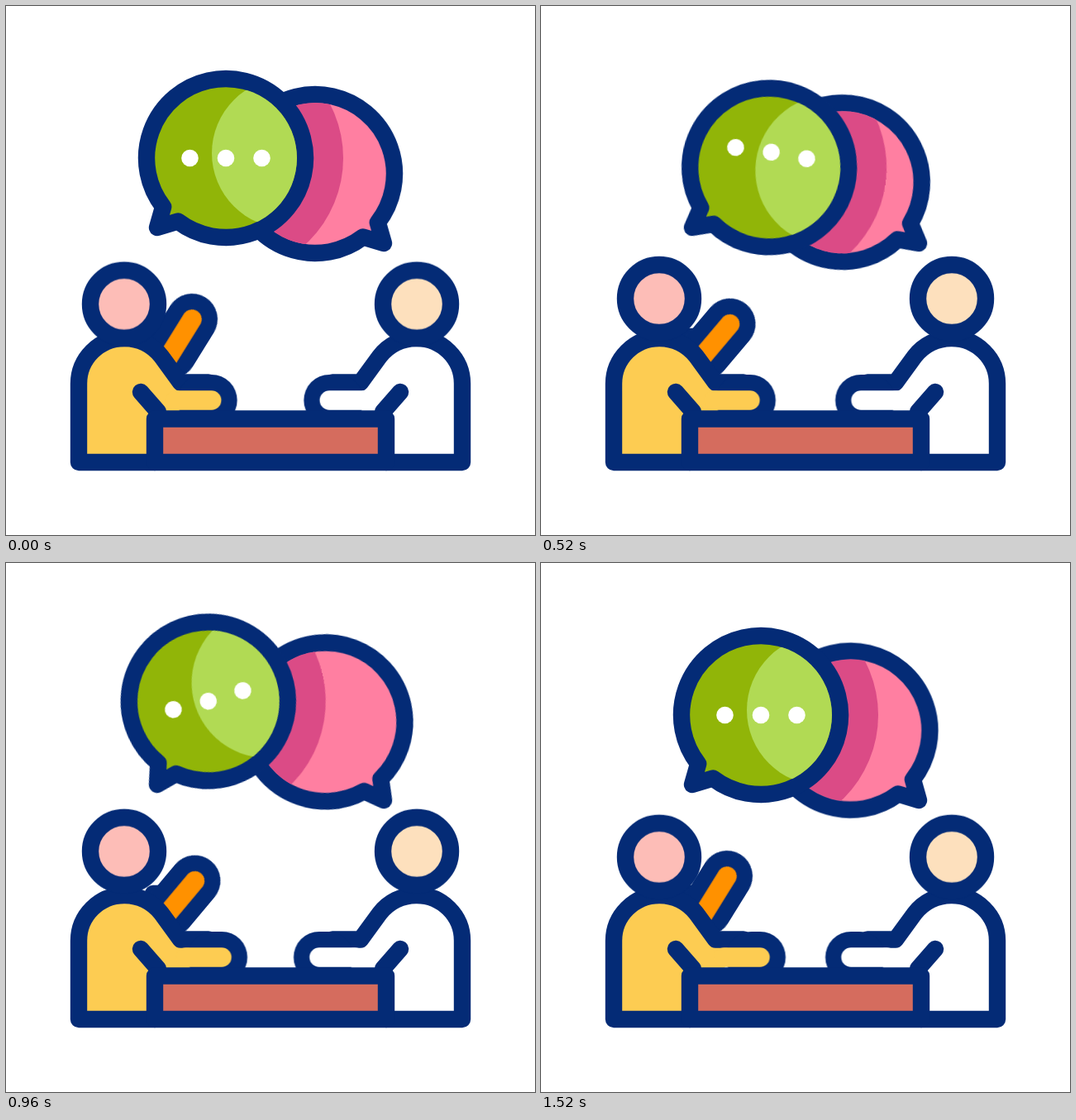
These frames come from a looping animation (640x640 px, 1560 ms). An HTML page without scripts:

```html
<!DOCTYPE html>
<html lang="en">
<head>
<meta charset="utf-8">
<title>Two people talking</title>
<style>
  html, body { margin: 0; width: 100%; height: 100%; overflow: hidden; background: #fff; }
  svg { display: block; width: 100%; height: 100%; }

  .line { stroke: #042b76; stroke-width: 20.4; stroke-linecap: round; stroke-linejoin: round; }
  .limb { fill: none; stroke-linecap: round; }
  .navy { stroke: #042b76; stroke-width: 62; }
  .skin { stroke: currentColor; stroke-width: 23.5; }
  .face { fill: var(--face); }

  .swing, .hop, .reach, .lean {
    animation: 1.56s cubic-bezier(.37, 0, .63, 1) var(--lag, 0s) infinite;
  }
  .swing { animation-name: swing; }
  .hop { animation-name: hop; }
  .reach { animation-name: reach; }
  .lean { animation-name: lean; }

  @keyframes swing {
    0%, 89.74%, 100% { transform: rotate(0deg); }
    30.77% { transform: rotate(7.8deg); }
    61.54%, 64.1% { transform: rotate(-13.1deg); }
  }
  @keyframes hop {
    0%, 57.69%, 100% { transform: translateY(0); }
    29.49%, 32.05% { transform: translateY(var(--rise)); }
  }
  @keyframes reach {
    0%, 89.1%, 100% { transform: translateX(0); }
    46.15%, 50% { transform: translateX(16.5px); }
  }
  @keyframes lean {
    0%, 89.1%, 100% { transform: translate(225px, 379px) rotate(31.8deg); }
    46.15%, 50% { transform: translate(229.3px, 386px) rotate(42deg); }
  }

  .person { --rise: -12.2px; }
  .dots { --rise: -19px; fill: #fff; }
  .late { --lag: .16s; }
</style>
</head>
<body>
<svg viewBox="0 0 640 640">
  <defs>
    <!-- Bubbles are drawn with the tip of the tail at the origin -->
    <path id="bubble" class="line" d="M7.2-25.1A96 96 0 1 1 25-7.5L0 0Z"/>
    <clipPath id="disc"><circle cx="83" cy="-84" r="86"/></clipPath>
    <clipPath id="pinkDisc" transform="translate(457 287) scale(-1 1)">
      <circle class="swing late" cx="83" cy="-84" r="86"/>
    </clipPath>

    <g id="person">
      <path class="line" fill="currentColor" d="M180 552H88V457A55 55 0 0 1 143 402A55 55 0 0 1 188 424L211 455.5H245"/>
      <g class="reach">
        <path class="limb navy" d="M238 477H248.5"/>
        <path class="limb skin" d="M205 477H248.5"/>
      </g>
      <path class="line" fill="none" d="M163 467L184 491"/>
      <g class="hop"><circle class="line face" cx="143" cy="361" r="41"/></g>
    </g>
  </defs>

  <g transform="translate(457 287) scale(-1 1)">
    <g class="swing late"><use href="#bubble" fill="#ff7fa1"/></g>
  </g>
  <g clip-path="url(#pinkDisc)">
    <g transform="translate(183 268)">
      <circle class="swing" cx="83" cy="-84" r="142" fill="#db4b86"/>
    </g>
  </g>

  <g transform="translate(183 268)">
    <g class="swing">
      <use href="#bubble" fill="#91b508"/>
      <g clip-path="url(#disc)"><circle cx="157" cy="-90" r="91" fill="#b1da54"/></g>
      <g class="dots">
        <circle class="hop" cx="39.5" cy="-84" r="10.3"/>
        <circle class="hop" cx="83" cy="-84" r="10.3" style="--lag: .09s"/>
        <circle class="hop" cx="126.5" cy="-84" r="10.3" style="--lag: .17s"/>
      </g>
    </g>
  </g>

  <!-- Raised arm behind the left person -->
  <path class="line" d="M178 400h8"/>
  <g class="lean" style="color: #ff9100">
    <path class="limb navy" d="M0 0V48"/>
    <path class="limb skin" d="M0 0V56"/>
  </g>

  <g class="person" style="color: #fdcc52; --face: #fdbdb7"><use href="#person"/></g>
  <g class="person" transform="translate(640 0) scale(-1 1)" style="color: #fff; --face: #fde0bd">
    <g style="--lag: 0s">
      <use href="#person" style="--lag: 0s"/>
    </g>
  </g>

  <rect class="line" x="180" y="499.5" width="280" height="52.5" fill="#d56c5e"/>
</svg>
</body>
</html>
```
